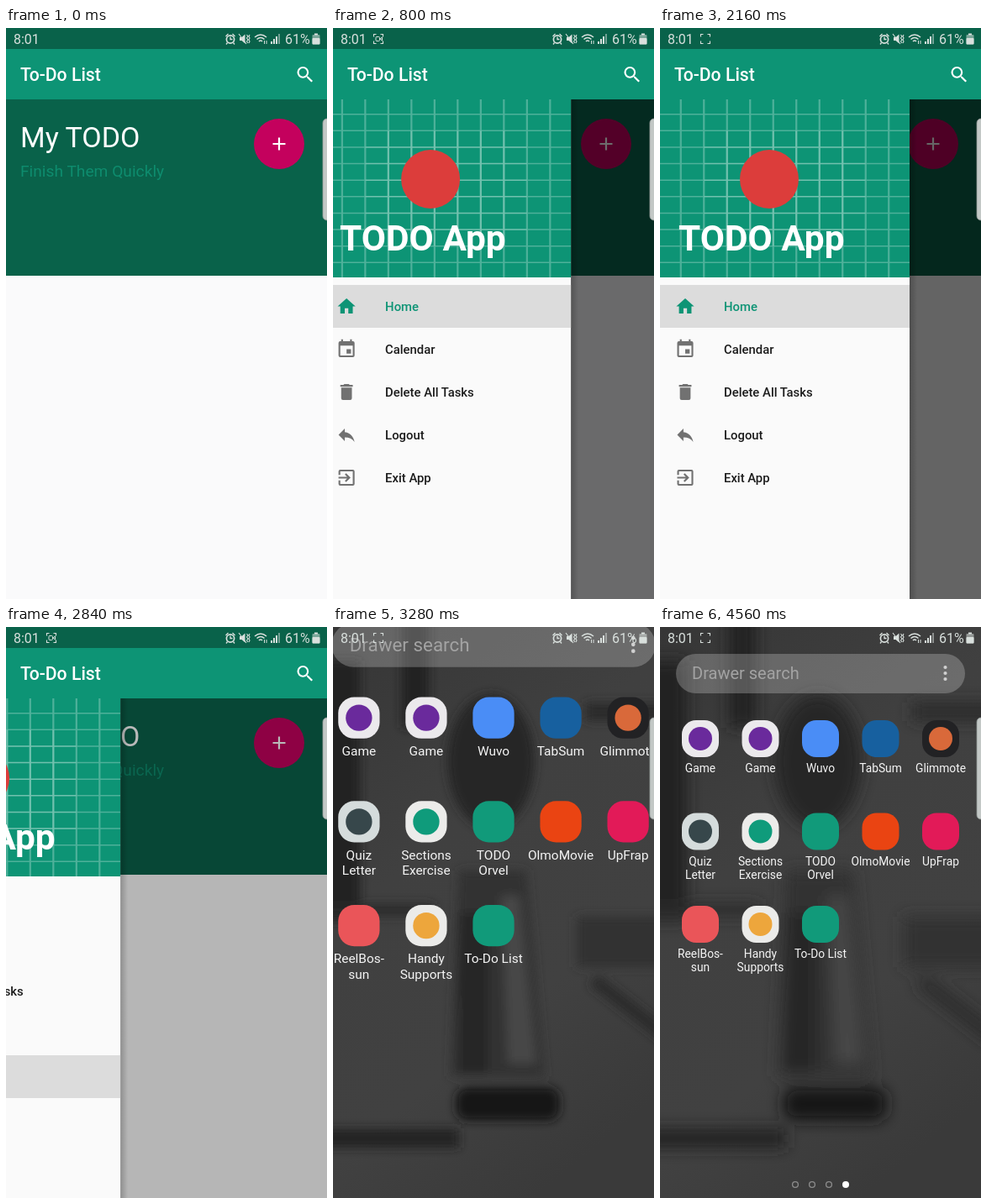
These frames come from a looping animation (382x680 px, 4.72 s). An HTML page:

```html
<!DOCTYPE html>
<html lang="en">
<head>
<meta charset="utf-8">
<title>To-Do List</title>
<style>
  html, body { margin: 0; width: 100%; height: 100%; overflow: hidden; background: #222; }
  svg { display: block; width: 100vw; height: 100vh; font-family: Roboto, sans-serif; }
  .row { color: #717171; }
  .row rect { fill: none; }
  .row text { fill: #1c1c1c; font-size: 14.85px; font-weight: 500; }
  .row.on { color: #0d9475; }
  .row.on rect { fill: #dcdcdc; }
  .row.on text { fill: #0d9475; }
  .label { fill: #f4f4f4; font-size: 13.8px; text-anchor: middle; }
</style>
</head>
<body>
<svg id="stage" viewBox="0 0 382 680"></svg>
<script>
const LOOP = 4720, STEP = 40, DRAWER = 297;
const GREEN = '#0d9475', DARK = '#09624a';

const rect = (x, y, w, h, fill, more = '') =>
  `<rect x="${x}" y="${y}" width="${w}" height="${h}" fill="${fill}" ${more}/>`;
const circle = (x, y, r, fill, more = '') =>
  `<circle cx="${x}" cy="${y}" r="${r}" fill="${fill}" ${more}/>`;
const text = (x, y, size, fill, str, more = '') =>
  `<text x="${x}" y="${y}" font-size="${size}" fill="${fill}" ${more}>${str}</text>`;
const line = (d, stroke, width, more = '') =>
  `<path d="${d}" fill="none" stroke="${stroke}" stroke-width="${width}" ${more}/>`;
const icon = (d, x, y, fill = 'currentColor') =>
  `<path d="${d}" fill="${fill}" transform="translate(${x - 12.7} ${y - 12.7}) scale(1.06)"/>`;

const SEARCH = 'M15.5 14h-.79l-.28-.27A6.47 6.47 0 0 0 16 9.5 6.5 6.5 0 1 0 9.5 16c1.61 0 3.09-.59 4.23-1.57l.27.28v.79l5 4.99L20.49 19zM9.5 14a4.5 4.5 0 1 1 0-9 4.5 4.5 0 0 1 0 9z';

const MENU = [
  ['Home', 'M10 20v-6h4v6h5v-8h3L12 3 2 12h3v8z'],
  ['Calendar', 'M17 12h-5v5h5zM16 1v2H8V1H6v2H5a2 2 0 0 0-2 2v14a2 2 0 0 0 2 2h14a2 2 0 0 0 2-2V5a2 2 0 0 0-2-2h-1V1zm3 18H5V8h14z'],
  ['Delete All Tasks', 'M6 19a2 2 0 0 0 2 2h8a2 2 0 0 0 2-2V7H6zM19 4h-3.5l-1-1h-5l-1 1H5v2h14z'],
  ['Logout', 'M10 9V5l-7 7 7 7v-4.1c5 0 8.5 1.6 11 5.1-1-5-4-10-11-11z'],
  ['Exit App', 'M10.09 15.59L11.5 17l5-5-5-5-1.41 1.41L12.67 11H3v2h9.67zM19 3H5a2 2 0 0 0-2 2v4h2V5h14v14H5v-4H3v4a2 2 0 0 0 2 2h14a2 2 0 0 0 2-2V5a2 2 0 0 0-2-2z'],
];

// label lines, tile colour, optional mark colour
const APPS = [
  ['Game', '#ebe9ec', '#6a2a9c'], ['Game', '#ebe9ec', '#6a2a9c'], ['Wuvo', '#4a8df6'],
  ['TabSum', '#17609f'], ['Glimmote', '#222224', '#d9693a'],
  ['Quiz/Letter', '#d5dcdc', '#37474b'], ['Sections/Exercise', '#ececea', '#0f9b7b'],
  ['TODO/Orvel', '#119a7a'], ['OlmoMovie', '#ea4412'], ['UpFrap', '#e21a58'],
  ['ReelBos-/sun', '#ea5559'], ['Handy/Supports', '#ebebe9', '#eda63c'], ['To-Do List', '#119a7a'],
];

function wallpaper() {
  return rect(-40, -40, 462, 760, 'url(#wall)') + `<g id="scene">` +
    rect(-30, 40, 62, 310, '#202020') +
    rect(82, -30, 32, 150, '#222') +
    `<ellipse cx="188" cy="160" rx="52" ry="80" fill="#262626"/>` +
    rect(-30, 330, 150, 14, '#2a2a2a') +
    `<path d="M150 290h80l22 245H140z" fill="#303030"/>` +
    rect(150, 340, 34, 190, '#252525') +
    `<path d="M200 320h22l20 200h-34z" fill="#464646"/>` +
    rect(146, 548, 124, 40, '#191919', 'rx="14"') +
    rect(-30, 598, 180, 22, '#222') +
    line('M310 420L400 490', '#2b2b2b', 16) +
    rect(300, 90, 110, 22, '#2b2b2b') +
    rect(290, 345, 120, 60, '#303030') + `</g>`;
}

function homeScreen() {
  const tiles = APPS.map(([name, tile, mark], i) => {
    const x = 48 + 71.5 * (i % 5), y = 133 + 110.5 * Math.floor(i / 5);
    return rect(x - 22, y - 22, 44, 44, tile, 'rx="17"') +
      (mark ? circle(x, y, 14, mark) : '') +
      name.split('/').map((part, k) =>
        `<text class="label" x="${x}" y="${y + 40 + 16.3 * k}">${part}</text>`).join('');
  }).join('');
  const dots = [161, 181, 201].map(x => circle(x, 664, 3.4, 'none', 'stroke="#8d8d8d" stroke-width="1.3"')).join('');
  return rect(19, 32, 344, 47, '#fff', 'rx="23.5" opacity=".23"') +
    text(38, 62, 20, '#a3a3a3', 'Drawer search') +
    [48, 55, 62].map(y => circle(339.5, y, 2.1, '#d0d0d0')).join('') +
    tiles + dots + circle(221, 664, 4, '#fff');
}

function headerGrid() {
  let full = '', inner = '';
  for (let p = 9; p < 108; p += 10) full += `M${p} 0V108M0 ${p}H108`;
  for (let p = 29; p < 80; p += 10) inner += `M${p} 19V89M19 ${p}H89`;
  return `<g transform="translate(0 85) scale(2.75 1.963)">` +
    line(full, '#fff', .8, 'opacity=".27"') + line(inner, '#fff', .8, 'opacity=".2"') + '</g>';
}

function drawer() {
  const rows = MENU.map(([name, d], i) => {
    const y = 306 + 51 * i;
    return `<g class="row">${rect(0, y, DRAWER, 51, 'none')}${icon(d, 30, y + 25.5)}` +
      `<text x="76" y="${y + 31}">${name}</text></g>`;
  }).join('');
  return rect(DRAWER, 85, 9, 595, 'url(#shade)') +
    rect(0, 85, DRAWER, 595, '#fafafa') + rect(0, 85, DRAWER, 212, GREEN) + headerGrid() +
    circle(130, 180, 35, '#dc3d3b') +
    text(22, 265, 42.4, '#fff', 'TODO App', 'font-weight="700"') + rows;
}

function app() {
  return rect(0, 0, 382, 680, '#fafafb') + rect(0, 85, 382, 210, DARK) +
    text(17, 142, 34, '#fff', 'My TODO') +
    text(17, 177, 19.2, '#0e8c6e', 'Finish Them Quickly') +
    circle(325, 138, 30, '#c4015d') + line('M317.5 138h15M325 130.5v15', '#fff', 2.2) +
    rect(0, 85, 382, 595, '#000', 'id="scrim"') +
    `<g id="drawer">${drawer()}</g>` +
    rect(0, 0, 382, 25, DARK) + rect(0, 25, 382, 60, GREEN) +
    text(17, 63, 21.2, '#fff', 'To-Do List', 'font-weight="500"') +
    icon(SEARCH, 356, 55.5, '#fff');
}

function statusBar() {
  const ink = '#d9e0dd';
  const bars = [0, 1, 2, 3].map(i => rect(315 + 3 * i, 16 - 3 * i, 2, 3 + 3 * i, ink, i > 2 ? 'opacity=".5"' : '')).join('');
  return text(9, 19, 16, ink, '8:01') + text(332, 19, 16, ink, '61%') +
    `<g id="corners">${line('M48.5 10.5v-3h3M56.5 7.5h3v3M59.5 15.5v3h-3M51.5 18.5h-3v-3', ink, 1.1)}</g>` +
    `<g id="camera">${rect(51, 10.5, 4.5, 5, 'none', `stroke="${ink}" rx="1"`)}${line('M56 13l2.5-2v4z', ink, 1)}</g>` +
    circle(267, 13.5, 4.6, 'none', `stroke="${ink}" stroke-width="1.7"`) +
    line('M267 10.5v3h2.5M261.5 10l3-3M272.5 10l-3-3M263.5 17.5l-1.5 2M270.5 17.5l1.5 2', ink, 1.3) +
    `<path d="M278 11h2.5l4-3.5v11l-4-3.5H278z" fill="${ink}"/>` +
    line('M277 7l9 12M286.5 8l1.5 2-1.5 2 1.5 2-1.5 2 1.5 2M290 8l-1 2 1 2-1 2 1 2-1 2', ink, 1.1) +
    line('M296 11q7-6 14 0M298.5 13.5q4.5-4 9 0M301 16q2-2 4 0', ink, 1.6) +
    line('M307.5 15v4M310 15v4', ink, 1) + bars +
    rect(367, 6.5, 4, 2, ink) + rect(364.5, 8, 9, 11.5, ink, 'rx="1" opacity=".55"') +
    rect(364.5, 12, 9, 7.5, ink, 'rx="1"');
}

const stage = document.getElementById('stage');
stage.innerHTML = `<defs>
    <linearGradient id="wall" x2=".5" y2="1">
      <stop offset="0" stop-color="#343434"/><stop offset=".45" stop-color="#404040"/>
      <stop offset=".75" stop-color="#414141"/><stop offset="1" stop-color="#3a3a3a"/>
    </linearGradient>
    <linearGradient id="shade"><stop stop-opacity=".22"/><stop offset="1" stop-opacity="0"/></linearGradient>
    <filter id="soft" filterUnits="userSpaceOnUse" x="-60" y="-60" width="502" height="800"><feGaussianBlur id="blur"/></filter>
    <clipPath id="window"><rect width="382" height="680"/></clipPath>
  </defs>
  <g>${wallpaper()}</g>
  <g id="home">${homeScreen()}</g>
  <g id="app" clip-path="url(#window)">${app()}</g>
  ${statusBar()}
  ${rect(377, 108, 12, 121, '#c3c8c6', 'rx="5" stroke="#8f9694" stroke-width=".8"')}`;

const ids = ['scrim', 'drawer', 'scene', 'blur', 'home', 'app', 'corners', 'camera'];
const parts = Object.fromEntries(ids.map(id => [id, document.getElementById(id)]));
const rows = [...document.querySelectorAll('.row')];
parts.scene.setAttribute('filter', 'url(#soft)');

const progress = (t, from, to) => Math.min(1, Math.max(0, (t - from) / (to - from)));
const scaleFromCentre = s => `translate(191 340) scale(${s}) translate(-191 -340)`;

function drawerFraction(t) {
  if (t < 2766) return 1 - (1 - progress(t, 20, 1120) ** 1.3) ** 3;
  return (1 - progress(t, 2766, 3278)) ** 5;
}

function render(t) {
  const open = drawerFraction(t);
  parts.scrim.setAttribute('opacity', .6 * open);
  parts.drawer.setAttribute('transform', `translate(${DRAWER * (open - 1)} 0)`);
  parts.drawer.setAttribute('visibility', open > .002 ? 'visible' : 'hidden');
  const selected = t < 2680 ? 0 : 4;
  rows.forEach((row, i) => row.classList.toggle('on', i === selected));

  const leave = progress(t, 3040, 3200);
  parts.app.setAttribute('transform', scaleFromCentre(1 - .346 * leave));
  parts.app.setAttribute('opacity', (1 - leave) ** 1.5);

  const settle = progress(t, 3040, 3480);
  parts.home.setAttribute('transform', scaleFromCentre(1 + .58 * (1 - settle) ** 2));
  parts.home.setAttribute('opacity', progress(t, 3020, 3130));
  parts.blur.setAttribute('stdDeviation', 2 + 7 * settle);

  // the recording badge blinks
  parts.corners.setAttribute('visibility', t < 40 ? 'hidden' : 'visible');
  const blink = Math.floor((t - 600) / 520);
  parts.camera.setAttribute('visibility', t >= 600 && blink % 2 === 0 && t < 4320 ? 'visible' : 'hidden');
}

const start = performance.now();
function frame() {
  const t = (performance.now() - start) % LOOP;
  render(Math.floor(t / STEP) * STEP);
  requestAnimationFrame(frame);
}
frame();
</script>
</body>
</html>
```
